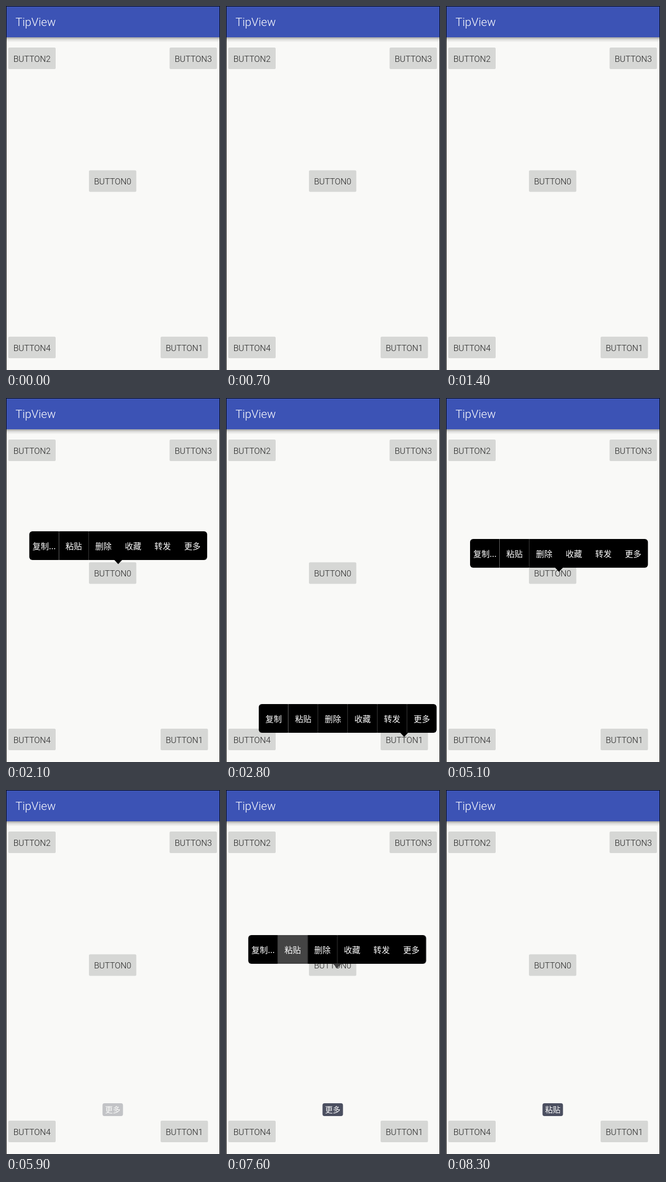
An HTML page for the animation above (9 s loop, 418 px wide and 710 px high).

```html
<!DOCTYPE html>
<html lang="zh">
<head>
<meta charset="utf-8">
<title>TipView</title>
<style>
html, body { margin: 0; width: 100%; height: 100%; overflow: hidden; background: #f9f9f7; }
svg { display: block; width: 418px; height: 710px; }
.latin { font-family: Roboto, sans-serif; font-weight: 300; }
.cjk { font-family: "Noto Sans CJK SC", "Noto Sans CJK", "Noto Sans CJK JP", sans-serif; fill: #fff; text-anchor: middle; }
.button rect { fill: #d6d7d5; }
.button text { font-size: 16.5px; fill: #222; text-anchor: middle; }
.tip { font-size: 16px; }
.timed { opacity: 0; animation: 9s step-end infinite; }

@keyframes tip2 { 0%, 7.77% { opacity: 0 } 1.11% { opacity: 1 } }
@keyframes tip3 { 0%, 15.55% { opacity: 0 } 12.22% { opacity: 1 } }
@keyframes tip0 { 0%, 26.66% { opacity: 0 } 23.33% { opacity: 1 } }
@keyframes tip1 { 0%, 37.77% { opacity: 0 } 31.11% { opacity: 1 } }
@keyframes tip4 { 0%, 49.99% { opacity: 0 } 44.44% { opacity: 1 } }
@keyframes more { 0%, 65.55% { opacity: 0 } 56.66% { opacity: 1 } }
@keyframes morePress { 0%, 65.55% { opacity: 0 } 61.11% { opacity: 1 } }
@keyframes paste { 0%, 86.66% { opacity: 0 } 74.44% { opacity: 1 } }
@keyframes pastePress { 0%, 86.66% { opacity: 0 } 84.44% { opacity: 1 } }
@keyframes moreToast {
  0% { opacity: 0 }
  65.55% { opacity: .32 }
  67.77% { opacity: .65 }
  68.88% { opacity: .88 }
  69.99% { opacity: 1 }
  86.66% { opacity: .8 }
  87.77% { opacity: .4 }
  88.88%, 100% { opacity: 0 }
}
@keyframes pasteToast {
  0% { opacity: 0 }
  88.88% { opacity: .15 }
  89.99% { opacity: .5 }
  91.11% { opacity: .85 }
  92.22%, 100% { opacity: 1 }
}
</style>
</head>
<body>
<svg id="stage" viewBox="0 0 418 710">
  <defs>
    <linearGradient id="shade" x2="0" y2="1">
      <stop stop-color="#000" stop-opacity=".34"/>
      <stop offset=".45" stop-color="#000" stop-opacity=".11"/>
      <stop offset="1" stop-color="#000" stop-opacity="0"/>
    </linearGradient>
  </defs>
  <rect width="418" height="710" fill="#f9f9f7"/>
  <rect y="61" width="418" height="10" fill="url(#shade)"/>
  <rect width="418" height="61" fill="#3c53b5"/>
  <text class="latin" x="18.5" y="38.5" font-size="22.6" fill="#fff">TipView</text>
</svg>
<script>
const stage = document.getElementById('stage');
const ITEM = 57.9, WIDTH = ITEM * 6, HEIGHT = 56, RADIUS = 6;
const ACTIONS = ['复制', '粘贴', '删除', '收藏', '转发', '更多'];
const add = markup => stage.insertAdjacentHTML('beforeend', markup);
const timed = (name, body) =>
  `<g class="timed" style="animation-name:${name}">${body}</g>`;

function button(x, y, label) {
  add(`<g class="button latin"><rect x="${x}" y="${y}" width="92.5" height="42" rx="2.5"/>
    <text x="${x + 46.3}" y="${y + 27.5}">${label}</text></g>`);
}

function tip(name, x, y, tipX, { up = false, first = '复制', lines = 5, pressed = -1 } = {}) {
  const edge = up ? .5 : HEIGHT - .5;
  const arrow = fill =>
    `<path d="M${tipX - x - 8} ${edge}h16l-8 ${up ? -8.5 : 8.5}z" fill="${fill}"/>`;
  const rules = ACTIONS.slice(0, lines).map((_, i) =>
    `<rect x="${Math.floor(x + ITEM * (i + 1)) - x}" width="1" height="${HEIGHT}" fill="${i ? '#3c3c3c' : '#666'}"/>`);
  const labels = ACTIONS.map((text, i) =>
    `<text x="${ITEM * (i + .5)}" y="34.5">${i ? text : first}</text>`);
  let press = '';
  if (pressed >= 0) {
    const r = pressed === 5 ? RADIUS : 0;
    press = timed(name + 'Press', `<path fill="#444"
      d="M${ITEM * pressed} 0h${ITEM - r}q${r} 0 ${r} ${r}v${HEIGHT - 2 * r}q0 ${r} ${-r} ${r}h${r - ITEM}z"/>${arrow('#444')}`);
  }
  add(timed(name, `<g class="tip cjk" transform="translate(${x} ${y})">
    <rect width="${WIDTH}" height="${HEIGHT}" rx="${RADIUS}" fill="#000"/>
    ${arrow('#000')}${rules.join('')}${press}${labels.join('')}</g>`));
}

function toast(name, text) {
  add(timed(name, `<rect x="188.5" y="611" width="40" height="25" rx="4" fill="#4b4f60"/>
    <text class="cjk" x="208.5" y="629.3" font-size="15">${text}</text>`));
}

button(4.5, 81, 'BUTTON2');
button(319.5, 81, 'BUTTON3');
button(162, 320.5, 'BUTTON0');
button(4.5, 645, 'BUTTON4');
button(302, 645, 'BUTTON1');

tip('tip2', 6, 121, 51, { up: true });
tip('tip3', 64, 119.5, 366, { up: true });
tip('tip0', 45.5, 260, 219.2, { first: '复制...', lines: 2 });
tip('tip1', 64, 597, 348);
tip('tip4', 6, 596, 71.5);
tip('more', 47, 275, 220.7, { first: '复制...', lines: 2, pressed: 5 });
tip('paste', 43.5, 283, 217.2, { first: '复制...', lines: 3, pressed: 1 });
toast('moreToast', '更多');
toast('pasteToast', '粘贴');

add('<path d="M.5 710V.5h417V710" fill="none" stroke="#000"/>');
</script>
</body>
</html>
```
